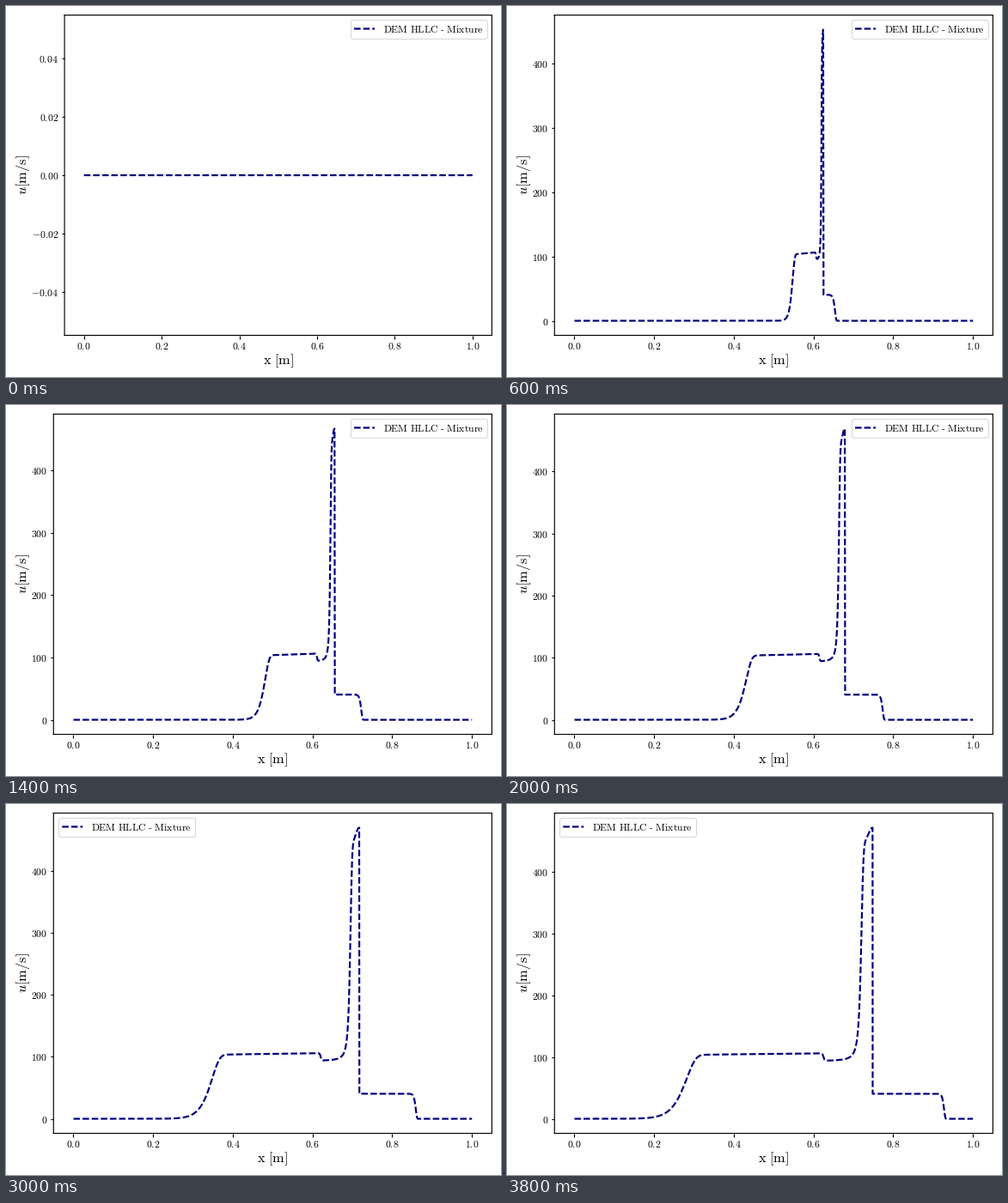
Animation of 576x432 px, one loop 4 s. Source, as a matplotlib script:

```python
import numpy as np
import matplotlib.pyplot as plt
from matplotlib.animation import FuncAnimation

W, H, DPI = 576, 432, 72
FRAMES, INTERVAL = 20, 200
TICK_SIZE, LABEL_SIZE = 11.75, 16.4
RIGHT, TOP, BOTTOM = 565.4, 10.6, 383.5
EDGE = 1.15

plt.rcParams["mathtext.fontset"] = "cm"
fig = plt.figure(figsize=(W / DPI, H / DPI), dpi=DPI, facecolor="white")
ax = fig.add_axes([0.1, 0.1, 0.8, 0.8])
xlabel = fig.text(0, 1 - 417.6 / H, r"$\mathrm{x\ [m]}$",
                  size=LABEL_SIZE, ha="center", va="baseline")
fig.text(23.8 / W, 1 - 197 / H, r"$u\mathrm{[m/s]}$", size=LABEL_SIZE,
         rotation=90, rotation_mode="anchor", ha="center", va="baseline")


def rise(z):
    """Sigmoid with a long lower tail and a sharp upper corner."""
    return 1 - np.exp(-np.exp(np.clip(z, -60, 6)))


def peak_speed(k):
    return np.interp(k, [1, 2, 3, 5, 7, 10, 13, 19],
                     [398, 440, 453, 463, 467.3, 469, 469.8, 471.3])


def velocity(k):
    """Velocity profile: rarefaction, plateau, spike at the contact, shock."""
    contact = 0.601 + 0.00774 * k
    x = np.sort(np.append(np.linspace(0, 1, 1201), [contact, contact + 7e-4]))

    fan = 0.5975 - 0.01662 * k
    along = np.clip((x - fan) / (0.605 - fan), 0, 1)
    v = (102.9 + 2.6 * along**0.6) * rise((x - fan) / (0.00215 * k**0.8))

    dip = 0.603 + 0.00115 * k
    step = 0.5 + 0.5 * np.tanh((x - dip) / (0.0012 + 0.00008 * k))
    v += (93.5 - v) * step

    # steep front with a slow tail, easing to the peak at the contact
    length = 0.0015 * k
    width = 0.00085 * k**0.8

    def front(d):
        return rise(2 * np.arcsinh((length - d) / width) - 0.25)

    behind = contact - x
    ease = 28 * (1 - np.exp(-(behind / (0.55 * length))**2))
    v += front(behind) / front(0) * (peak_speed(k) - v - ease)

    shock = 0.6027 + 0.0171 * k
    tail = 40.5 * (1 - rise((x - shock) / 0.0028))
    return x, np.where(x > contact, tail, v)


def draw(k):
    ax.clear()
    left = 55.3 if k else 68.1
    ax.set_position([left / W, 1 - BOTTOM / H,
                     (RIGHT - left) / W, (BOTTOM - TOP) / H])
    xlabel.set_x((left + RIGHT) / 2 / W)

    if k:
        x, v = velocity(k)
        top = peak_speed(k)
        ax.set_ylim(-0.05 * top, 1.05 * top)
        ticks = np.arange(0, 1.05 * top, 50 if k == 1 else 100)
        names = [f"${t:.0f}$" for t in ticks]
    else:
        x = np.linspace(0, 1, 201)
        v = np.zeros_like(x)
        ax.set_ylim(-0.055, 0.055)
        ticks = [-0.04, -0.02, 0, 0.02, 0.04]
        names = [f"${t:.2f}$" for t in ticks]

    ax.plot(x, v, color="navy", lw=2.2, ls=(0, (3.45, 1.37)), snap=False,
            label=r"$\mathrm{DEM\ HLLC\ }\text{-}\mathrm{\ Mixture}$")
    ax.set_xlim(-0.05, 1.05)
    ax.set_yticks(ticks, names)
    xticks = np.linspace(0, 1, 6)
    ax.set_xticks(xticks, [f"${t:.1f}$" for t in xticks])
    ax.tick_params(labelsize=TICK_SIZE, width=EDGE)
    ax.tick_params(axis="x", pad=2.7)
    for part in [*ax.spines.values(), *ax.get_xticklines(),
                 *ax.get_yticklines()]:
        part.set_snap(False)
    for spine in ax.spines.values():
        spine.set_linewidth(EDGE)

    legend = ax.legend(loc="upper left" if k >= 13 else "upper right",
                       fontsize=TICK_SIZE, handlelength=2.04,
                       handletextpad=0.82, borderpad=0.36, borderaxespad=0.49)
    for handle in legend.get_lines():
        handle.set_snap(False)
    return []


anim = FuncAnimation(fig, draw, frames=FRAMES, init_func=lambda: draw(0),
                     interval=INTERVAL, repeat=True, repeat_delay=0)
plt.show()
```
